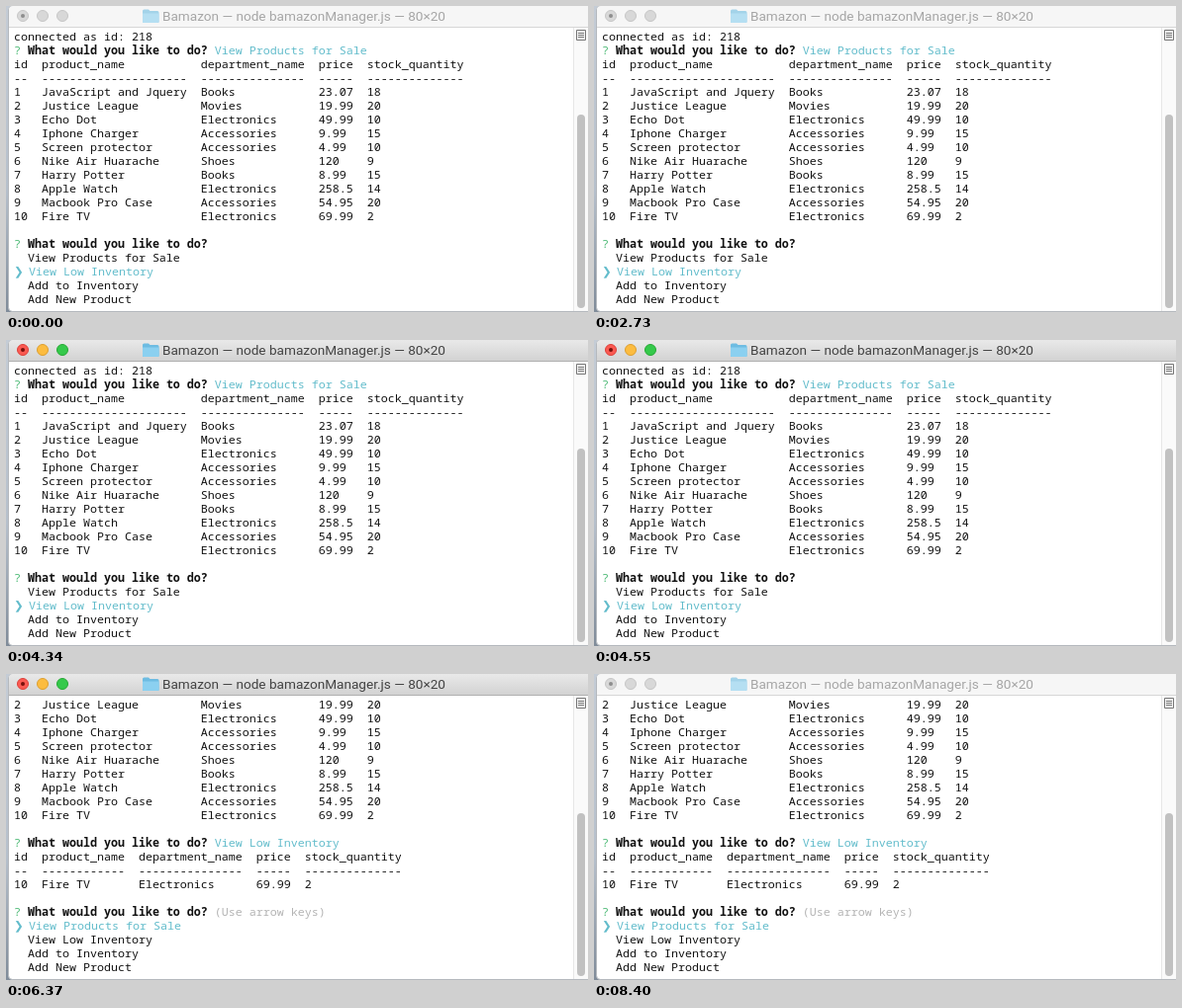
These frames come from a looping animation (588x310 px, 8470 ms). An HTML page:

```html
<!DOCTYPE html>
<html lang="en">
<head>
<meta charset="utf-8">
<style>
html, body { margin: 0; width: 588px; height: 310px; overflow: hidden; background: #fff; }
body { position: relative; }
svg, pre, #title { position: absolute; left: 0; top: 0; }
#title {
  left: 158px; line-height: 21px; white-space: pre; color: #a6a6a6;
  font: 13.6px/21px Roboto, sans-serif;
}
pre {
  left: 8px; top: 24px; margin: 0; color: #111;
  font: 11.667px/14px "Noto Sans Mono", monospace;
}
.ask { color: #4dba76; }
.pick { color: #62bccb; }
.hint { color: #b4b4b4; }
.mark {
  display: inline-block; width: 1ch; line-height: 0;
  font-family: "DejaVu Sans", sans-serif; font-weight: bold;
}
.bar { fill: #f6f6f6; }
.edge { stroke: #d6d6d6; }
.light { fill: #d8d8d8; stroke: #c6c6c6; }
.dot { fill: #8e8e8e; }
.folder { opacity: .6; }
.active #title { color: #434343; }
.active .bar { fill: url(#chrome); }
.active .edge { stroke: #b0b0b0; }
.active .dot { fill: #76100c; }
.active .folder { opacity: 1; }
.active .red { fill: #fb5a52; stroke: #dd4039; }
.active .amber { fill: #fcbc40; stroke: #dd9f2f; }
.active .green { fill: #35c94b; stroke: #26a934; }
</style>
</head>
<body>
<svg width="588" height="310">
  <defs>
    <linearGradient id="chrome" x2="0" y2="1">
      <stop stop-color="#e9e9e9"/><stop offset="1" stop-color="#d1d1d1"/>
    </linearGradient>
    <linearGradient id="desk" x2="0" y2="1">
      <stop stop-color="#c4ccd6"/><stop offset=".6" stop-color="#b6c0cc"/><stop offset="1" stop-color="#7f8b99"/>
    </linearGradient>
  </defs>
  <rect width="588" height="310" fill="url(#desk)"/>
  <path d="M2.500 4q0-4 4-4H588V309.500H6.500q-4 0-4-4z" fill="#fff" stroke="#b5b9be"/>
  <path class="bar" d="M3 4q0-4 4-4H588V22H3z"/>
  <path class="edge" d="M3 21.500H588"/>
  <g>
    <circle class="light red" cx="17" cy="10" r="5.500"/>
    <circle class="light amber" cx="37" cy="10" r="5.500"/>
    <circle class="light green" cx="57" cy="10" r="5.500"/>
    <circle class="dot" cx="17" cy="10" r="2"/>
  </g>
  <g class="folder">
    <path d="M138 5q0-1.500 1.500-1.500h4.500l1.500 1.500h7.500q1.500 0 1.500 1.500V16q0 1-1 1H139q-1 0-1-1z" fill="#6dbce2"/>
    <path d="M138 7.500H154.500V16q0 1-1 1H139q-1 0-1-1z" fill="#8bd0f0"/>
  </g>
  <path d="M573 22H588V309H573z" fill="#fafafa"/>
  <path d="M573.500 22V309" stroke="#e6e6e6"/>
  <path d="M576.500 24.500h9v10h-9z" fill="#f4f4f4" stroke="#777"/>
  <path d="M578 27.500h6M578 29.500h6M578 31.500h6" stroke="#777"/>
  <rect id="thumb" x="577" width="8" rx="4" fill="#c1c1c1"/>
</svg>
<div id="title">Bamazon — node bamazonManager.js — 80×20</div>
<pre id="screen"></pre>
<script>
const LOOP = 8470, FOCUS = 4340, ENTER = 4760, BLUR = 8400;
const header = ["id", "product_name", "department_name", "price", "stock_quantity"];
const products = `JavaScript and Jquery,Books,23.07,18
Justice League,Movies,19.99,20
Echo Dot,Electronics,49.99,10
Iphone Charger,Accessories,9.99,15
Screen protector,Accessories,4.99,10
Nike Air Huarache,Shoes,120,9
Harry Potter,Books,8.99,15
Apple Watch,Electronics,258.5,14
Macbook Pro Case,Accessories,54.95,20
Fire TV,Electronics,69.99,2`.split("\n").map((row, i) => [`${i + 1}`, ...row.split(",")]);
const choices = ["View Products for Sale", "View Low Inventory", "Add to Inventory", "Add New Product"];

const span = (name, text) => `<span class="${name}">${text}</span>`;
const ask = (answer = "") => `${span("ask", "?")} <b>What would you like to do?</b> ${answer}`;
const menu = picked => choices.map((text, i) =>
  i === picked ? span("pick", `${span("mark", "❯")} ${text}`) : `  ${text}`);

function table(rows) {
  const widths = header.map((name, i) => Math.max(name.length, ...rows.map(row => row[i].length)));
  const rule = widths.map(width => "-".repeat(width));
  return [header, rule, ...rows].map(row => row.map((cell, i) => cell.padEnd(widths[i])).join("  "));
}

const log = ["connected as id: 218", ask(span("pick", choices[0])), ...table(products), ""];
const lowStock = products.filter(row => row[4] < 5);
const screens = [
  [...log, ask(), ...menu(1)],
  [...log, ask(span("pick", choices[1])), ...table(lowStock), "",
    ask(span("hint", "(Use arrow keys)")), ...menu(0)]
].map(lines => lines.slice(-20).join("\n"));

const screen = document.getElementById("screen");
const thumb = document.getElementById("thumb");
let shown;

function draw(now) {
  const t = now % LOOP;
  const page = t < ENTER ? 0 : 1;
  document.body.classList.toggle("active", t >= FOCUS && t < BLUR);
  if (page !== shown) {
    shown = page;
    screen.innerHTML = screens[page];
    const top = page ? 141 : 110;
    thumb.setAttribute("y", top);
    thumb.setAttribute("height", 306 - top);
  }
  requestAnimationFrame(draw);
}
draw(performance.now());
</script>
</body>
</html>
```
